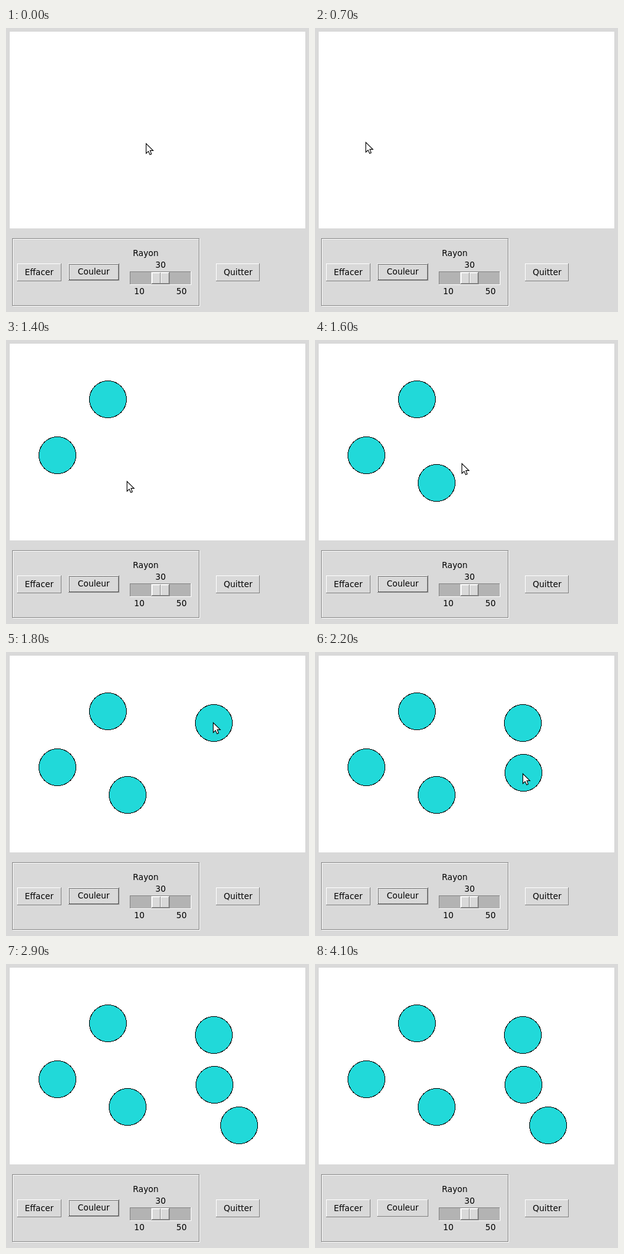
Recreate the animation shown at these times as an HTML page. Size 492 px wide and 462 px high, loop 5400 ms.

```html
<!DOCTYPE html>
<html lang="fr">
<head>
<meta charset="utf-8">
<title>Cercles</title>
<style>
  html, body { margin: 0; width: 100%; height: 100%; overflow: hidden; background: #d9d9d9; }
  svg { display: block; font: 13.33px "DejaVu Sans", sans-serif; }
  path, rect, circle { shape-rendering: crispEdges; }
  .hi, .lo, .dots { fill: none; stroke: #fff; }
  .lo { stroke: #828282; }
  .dots { stroke: #000; stroke-dasharray: 1 1; stroke-dashoffset: .5; }
  circle { fill: #21d9d9; stroke: #000; }
  #cursor { fill: #fff; stroke: #000; stroke-width: 1.1; shape-rendering: geometricPrecision; }

  circle, .dots, #cursor { animation: 5.4s step-end infinite; }
  #cursor { animation-name: move; }
  .dots { animation-name: blur; }
  #c1 { animation-name: c1; }
  #c2 { animation-name: c2; }
  #c3 { animation-name: c3; }
  #c4 { animation-name: c4; }
  #c5 { animation-name: c5; }
  #c6 { animation-name: c6; }

  @keyframes c1 { 0% { opacity: 0 } 14.81%, 100% { opacity: 1 } }
  @keyframes c2 { 0% { opacity: 0 } 22.22%, 100% { opacity: 1 } }
  @keyframes c3 { 0% { opacity: 0 } 27.77%, 100% { opacity: 1 } }
  @keyframes c4 { 0% { opacity: 0 } 33.33%, 100% { opacity: 1 } }
  @keyframes c5 { 0% { opacity: 0 } 38.88%, 100% { opacity: 1 } }
  @keyframes c6 { 0% { opacity: 0 } 50%, 100% { opacity: 1 } }
  @keyframes blur { 0% { opacity: 1 } 75.92%, 100% { opacity: 0 } }

  /* the pointer is sampled every 100 ms */
  @keyframes move {
    0% { transform: translate(227px, 187px); opacity: 1 }
    1.85% { transform: translate(216px, 218px) }
    3.7% { transform: translate(183px, 263px) }
    5.55% { transform: translate(136px, 276px) }
    7.4% { transform: translate(95px, 236px) }
    9.25% { transform: translate(81px, 190px) }
    12.96% { transform: translate(82px, 185px) }
    14.81% { transform: translate(82px, 186px) }
    16.66% { transform: translate(94px, 168px) }
    18.51% { transform: translate(130px, 123px) }
    20.37% { transform: translate(160px, 98px) }
    22.22% { transform: translate(164px, 95px) }
    24.07% { transform: translate(177px, 155px) }
    25.92% { transform: translate(196px, 229px) }
    27.77% { transform: translate(196px, 231px) }
    29.62% { transform: translate(238px, 200px) }
    31.48% { transform: translate(312px, 134px) }
    33.33% { transform: translate(336px, 114px) }
    35.18% { transform: translate(336px, 146px) }
    37.03% { transform: translate(337px, 188px) }
    38.88% { transform: translate(337px, 195px) }
    40.74% { transform: translate(337px, 197px) }
    42.59% { transform: translate(344px, 200px) }
    44.44% { transform: translate(360px, 207px) }
    46.29% { transform: translate(371px, 236px) }
    48.14% { transform: translate(377px, 258px) }
    50% { transform: translate(377px, 261px) }
    51.85% { transform: translate(379px, 268px); opacity: 1 }
    53.7%, 100% { transform: translate(379px, 268px); opacity: 0 }
  }
</style>
</head>
<body>
<svg width="492" height="462" viewBox="0 0 492 462">
  <rect width="492" height="462" fill="#d9d9d9"/>
  <rect x="6" y="6" width="480" height="320" fill="#fff"/>

  <!-- grooved frame -->
  <rect class="hi" x="11.5" y="343.5" width="303" height="109"/>
  <rect class="lo" x="10.5" y="342.5" width="303" height="109"/>

  <!-- buttons -->
  <path class="hi" d="M18.5 412V383.5H90M101.5 411V383.5H184M341.5 412V383.5H412"/>
  <path class="lo" d="M18 411.5H89.5V383M101 410.5H183.5V383M341 411.5H411.5V383"/>
  <rect class="dots" x="102.5" y="384.5" width="80" height="25"/>
  <text x="30.5" y="402">Effacer</text>
  <text x="116.5" y="401">Couleur</text>
  <text x="353.5" y="402">Quitter</text>

  <!-- radius scale -->
  <rect x="201" y="396" width="100" height="22" fill="#b3b3b3"/>
  <path class="lo" d="M201.5 418V396.5H301"/>
  <path class="hi" d="M201 417.5H300.5V396"/>
  <rect x="236" y="397" width="30" height="20" fill="#d9d9d9"/>
  <path class="hi" d="M236.5 417V397.5H266M237.5 416V398.5H251M251.5 416V398.5H265"/>
  <path class="lo" d="M236 416.5H265.5V397M237 415.5H250.5V398M251 415.5H264.5V398"/>
  <text x="206" y="371">Rayon</text>
  <text x="242.5" y="390">30</text>
  <text x="208" y="433">10</text>
  <text x="276.5" y="433">50</text>

  <circle id="c1" cx="83.5" cy="187.5" r="30"/>
  <circle id="c2" cx="165.5" cy="96.5" r="30"/>
  <circle id="c3" cx="197.5" cy="232.5" r="30"/>
  <circle id="c4" cx="337.5" cy="115.5" r="30"/>
  <circle id="c5" cx="338.5" cy="196.5" r="30"/>
  <circle id="c6" cx="378.5" cy="262.5" r="30"/>

  <path id="cursor" d="M.5 1V17L4.2 13.6L6.7 19L9.2 18L7 12.4H12Z"/>
</svg>
</body>
</html>
```
